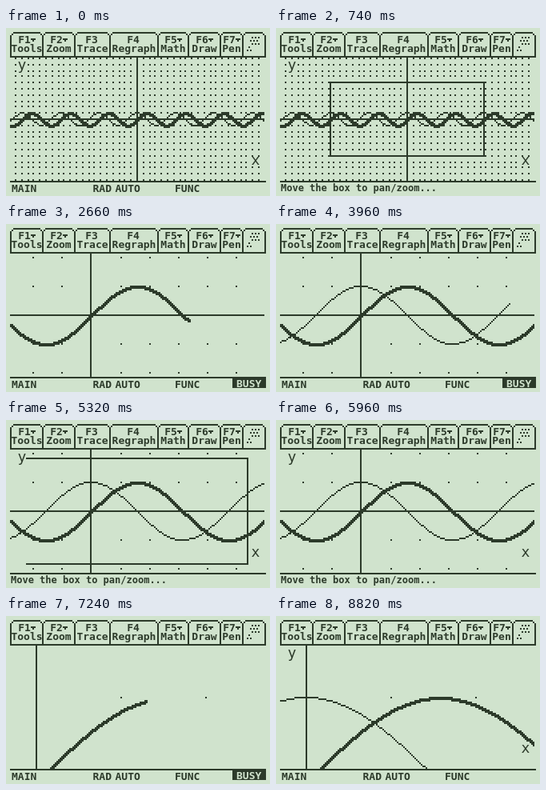
Write an HTML page that moves like this. It is 330 by 210 pixels and loops after 9200 ms.

```html
<!DOCTYPE html>
<html lang="en">
<head>
<meta charset="utf-8">
<title>Zooming a graph</title>
<style>
html, body { margin: 0; width: 100%; height: 100%; overflow: hidden; background: #d0e3cd; }
svg { display: block; width: 330px; height: 210px; }
text { font: bold 13px "DejaVu Sans Mono", monospace; fill: #2c3a2a; white-space: pre; }
.mid { text-anchor: middle; }
.msg { font-size: 12px; }
.axis { font-size: 18px; font-weight: normal; }
path, rect { shape-rendering: crispEdges; fill: #2c3a2a; }
.light { fill: #d0e3cd; }
</style>
</head>
<body>
<svg viewBox="0 0 330 210" xmlns="http://www.w3.org/2000/svg">
  <rect class="light" width="330" height="210"/>
  <g id="bar"></g>
  <g transform="translate(5 37) scale(2)">
    <path id="grid"/><path id="axes"/><path id="thick"/><path id="thin"/>
  </g>
  <g id="labels">
    <rect class="light" x="15" y="43" width="12" height="14"/>
    <rect class="light" x="305" y="161" width="14" height="12"/>
    <text class="axis mid" x="20" y="52">y</text>
    <text class="axis mid" x="312" y="171">x</text>
  </g>
  <g transform="translate(5 37) scale(2)"><path id="box"/></g>
  <rect x="5" y="191" width="320" height="2"/>
  <g id="status">
    <text x="7" y="205">MAIN</text>
    <text x="108.5" y="205">RAD</text>
    <text x="136.5" y="205">AUTO</text>
    <text x="211" y="205">FUNC</text>
    <path id="key" d="M95 195h2v2h2v2h2v2h-2v2h-2v2h-2v-2h-2v-2h-2v-2h2v-2h2z"/>
  </g>
  <g id="busy">
    <rect x="283" y="193" width="42" height="12"/>
    <text class="light" x="288" y="204">BUSY</text>
  </g>
  <text id="msg" class="msg" x="6" y="204">Move the box to pan/zoom...</text>
</svg>
<script>
const LOOP = 9200, W = 159, H = 77, COL_MS = 6.72, COS_LAG = 1085;
const $ = id => document.getElementById(id);
const round = Math.round;
const cell = (x, y, w = 1, h = 1) => `M${x} ${y}h${w}v${h}h${-w}z`;
const show = (id, on) => $(id).style.display = on ? "" : "none";

// Toolbar: left edge, right edge, name, menu arrow
const tabs = [
  [6, 46, "Tools", 1], [46, 86, "Zoom", 1], [86, 130, "Trace", 0], [130, 190, "Regraph", 0],
  [190, 228, "Math", 1], [228, 268, "Draw", 1], [268, 296, "Pen", 1], [296, 324, "", 0]
];
const frame = (a, b) => cell(a - 1, 9, 2, 26) + cell(a + 1, 7, 2, 2) +
  cell(a + 3, 5, b - a - 6, 2) + cell(b - 3, 7, 2, 2) + cell(b - 1, 9, 2, 26);

// Dimmed icon in the last tab
let icon = cell(303, 23, 2, 2) + cell(301, 27, 2, 2) + cell(305, 27, 2, 2);
for (let r = 0; r < 3; r++)
  for (let c = 0; c < 3; c++) icon += cell(307 + c * 4 - (r % 2) * 2, 11 + r * 4, 2, 2);

$("bar").innerHTML = tabs.map(([a, b, name, menu], i) => {
  const mid = (a + b) / 2, fx = menu ? mid - 3 : mid - 1;
  let s = `<path d="${frame(a, b)}"/>`;
  if (!name) return s;
  s += `<text class="mid" x="${fx}" y="19">F${i + 1}</text>
        <text class="mid" x="${mid}" y="30">${name}</text>`;
  if (menu) s += `<path d="M${fx + 8} 13h6v2h-2v2h-2v-2h-2z"/>`;
  return s;
}).join("") + `<path d="${cell(5, 35, 320, 2) + icon}"/>`;

// Each view: pixel of the origin, pixels per unit
function makeView(ox, oy, ux, uy) {
  const v = { ox, oy, ux, uy, grid: "", axes: "" };
  for (let i = -20; i <= 20; i++)
    for (let j = -10; j <= 10; j++) {
      const x = round(ox + i * ux), y = round(oy + j * uy);
      if (x >= 0 && x < W && y >= 0 && y < H) v.grid += cell(x, y);
    }
  v.axes = cell(round(ox), 0, 1, H);
  if (oy < H) v.axes += cell(0, round(oy), W, 1);
  return v;
}
const views = [
  makeView(79, 38, 3.8, 3.8),
  makeView(50.4, 38, 18.17, 18.05),
  makeView(16, 84.8, 53.1, 52.76)
];

function curve(v, fn, cols, size) {
  const row = c => round(v.oy - v.uy * fn((c - v.ox) / v.ux));
  let d = "", prev = row(0);
  for (let c = 0; c < Math.min(cols, W); c++) {
    const y = row(c);
    let top = y, end = y;
    if (y > prev + 1) top = prev + 1;
    if (y < prev - 1) end = prev - 1;
    top = Math.max(top, 0);
    end = Math.min(end + size - 1, H - 1);
    if (y < H && end >= top) d += cell(c, top, Math.min(size, W - c), end - top + 1);
    prev = y;
  }
  return d;
}

// Box moves: shrink by five, then pan
function boxMoves(t0, dx, dy) {
  const list = [];
  for (let k = 0; k < 9; k++) {
    const pan = Math.max(0, k - 4);
    list.push({
      t: t0 + round(k * 106.5 / 20) * 20, gap: 20, part: k ? 0 : 3,
      x: round(79 + dx * pan), y: 38 + dy * pan, n: Math.min(k + 1, 5)
    });
  }
  return list;
}
const zooms = [
  { msg: 100, box: 180, side: 40, end: 1820, moves: boxMoves(440, 3, 0).concat([
    { t: 1440, gap: 20, part: 0, x: 91, y: 38, n: 6 },
    { t: 1600, gap: 0, x: 88, y: 38, n: 6 },
    { t: 1680, gap: 0, x: 85, y: 38, n: 6 }]) },
  { msg: 4980, box: 4980, side: 20, end: 6660, moves: boxMoves(5320, -0.25, -4).concat([
    { t: 6320, gap: 20, part: 0, x: 75, y: 22, n: 5 },
    { t: 6400, gap: 20, part: 0, x: 72, y: 22, n: 5 }]) }
];

function boxPath(z, t) {
  let m = { x: 79, y: 38, n: 0 }, sides = Math.floor((t - z.box) / z.side) + 1;
  for (const next of z.moves) if (t >= next.t) {
    m = next;
    sides = t < m.t + m.gap ? m.part : 4;
  }
  const hh = 38 - 5 * m.n, hw = round(hh * 79 / 38);
  const x = m.x - hw, y = m.y - hh, w = 2 * hw + 1, h = 2 * hh + 1;
  return [cell(x, y, w, 1), cell(x + w - 1, y, 1, h), cell(x, y + h - 1, w, 1), cell(x, y, 1, h)]
    .slice(0, Math.max(0, sides)).join("");
}

const plots = [
  { grid: -LOOP, start: -LOOP, done: -1 },
  { grid: 1860, start: 1910, done: 4080 },
  { grid: 6680, start: 6675, done: 8820 }
];

function draw(t) {
  const i = t < 1820 ? 0 : t < 6660 ? 1 : 2;
  const v = views[i], p = plots[i];
  const cols = lag => Math.floor((t - p.start - lag) / COL_MS) + 1;
  $("grid").setAttribute("d", t >= p.grid ? v.grid : "");
  $("axes").setAttribute("d", t >= p.grid ? v.axes : "");
  $("thick").setAttribute("d", curve(v, Math.sin, cols(0), 2));
  $("thin").setAttribute("d", curve(v, Math.cos, cols(COS_LAG), 1));

  const z = zooms.find(z => t >= z.msg && t < z.end);
  $("box").setAttribute("d", z ? boxPath(z, t) : "");
  show("msg", z);
  show("status", !z);
  show("key", t >= 4220 && t < 4320 || t >= 4760 && t < 4980);
  show("busy", t < p.done);
  show("labels", t >= p.done);
}

const began = performance.now();
let last = -1;
function tick() {
  const t = Math.floor((performance.now() - began) % LOOP / 20) * 20;
  if (t !== last) draw(last = t);
  requestAnimationFrame(tick);
}
tick();
</script>
</body>
</html>
```
